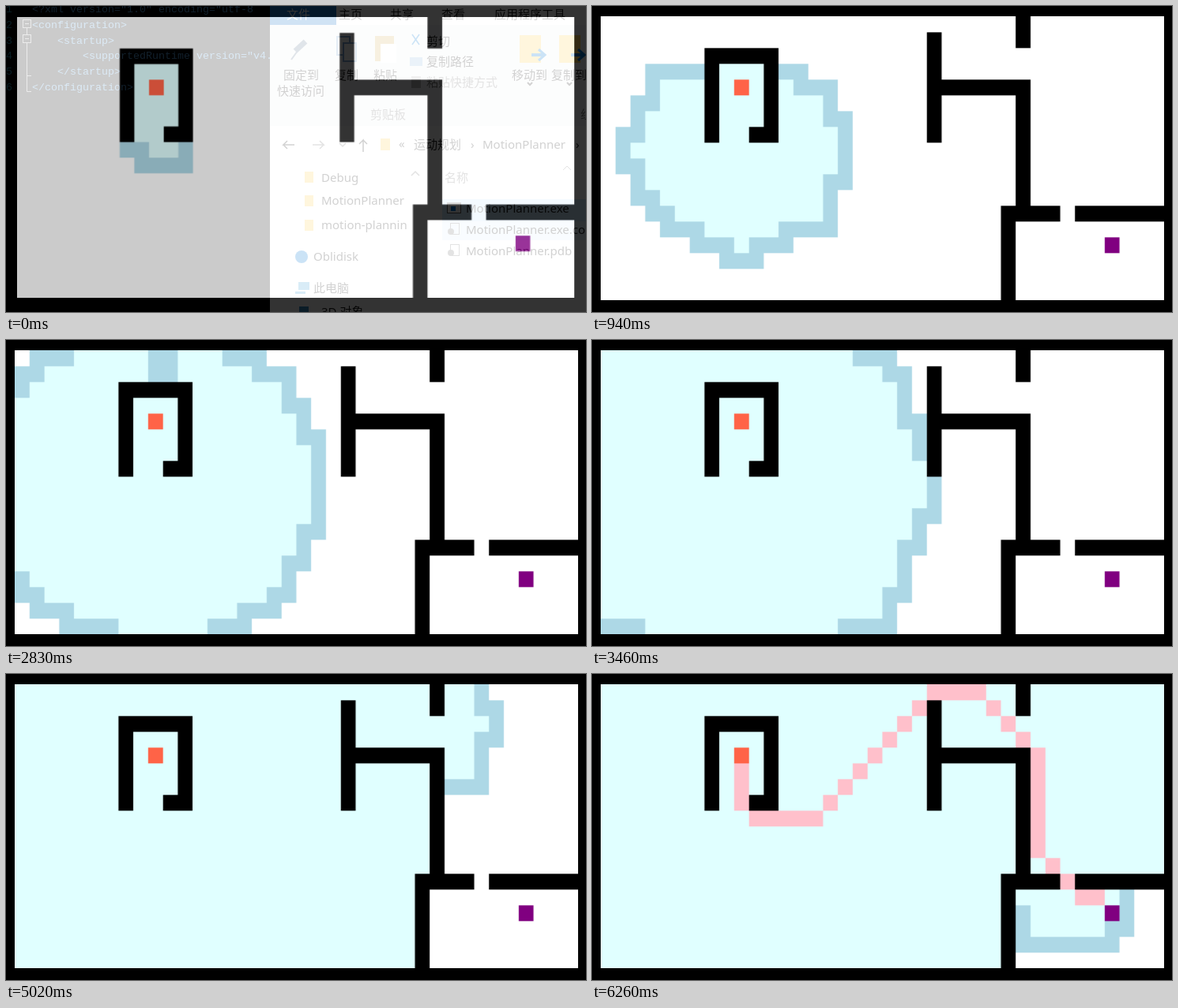
An HTML page with a canvas that plays this animation: 734x388 px, repeating every 8.52 s.

```html
<!DOCTYPE html>
<html lang="zh-CN">
<head>
<meta charset="utf-8">
<title>Grid search</title>
<style>
  html, body { margin: 0; width: 100%; height: 100%; overflow: hidden; background: #000; }
  canvas { display: block; }
</style>
</head>
<body>
<canvas id="stage" width="734" height="388"></canvas>
<script>
const W = 734, H = 388, COLS = 38, ROWS = 18;
const CELL_W = 75, CELL_H = 80, SCALE = 1 / 4, LEFT = 11.2, TOP = 13.4;
const LOOP = 8520, FIRST = 70, STEP = 78.3, LAST = 80;
const START = [9, 4], GOAL = [34, 14];
const COLOR = {
  free: '#fff', wall: '#000', closed: '#e0ffff', open: '#add8e6',
  path: '#ffc0cb', start: '#ff6347', goal: '#800080'
};

function surface(w, h) {
  const c = document.createElement('canvas');
  c.width = w;
  c.height = h;
  return c.getContext('2d');
}

const ctx = document.getElementById('stage').getContext('2d');
// The grid is drawn enlarged, then scaled down for soft cell edges
const grid = surface(COLS * CELL_W, ROWS * CELL_H);
ctx.imageSmoothingQuality = 'high';

// Walls: column, row, width, height in cells
const WALLS = [
  [7, 2, 5, 1], [7, 2, 1, 6], [11, 2, 1, 6], [10, 7, 1, 1],
  [22, 1, 1, 7], [22, 4, 7, 1], [28, 0, 1, 2], [28, 4, 1, 8],
  [27, 12, 4, 1], [32, 12, 6, 1], [27, 12, 1, 6]
];
const PATH = [[9, 5], [9, 7], [10, 8], [14, 8], [22, 0], [25, 0], [29, 4], [29, 10], [32, 13], [33, 13]];

const id = (c, r) => r * COLS + c;
const blocked = new Set();
for (const [c, r, w, h] of WALLS)
  for (let y = r; y < r + h; y++)
    for (let x = c; x < c + w; x++) blocked.add(id(x, y));

function neighbours(n) {
  const c = n % COLS, r = Math.floor(n / COLS), list = [];
  for (let dy = -1; dy <= 1; dy++)
    for (let dx = -1; dx <= 1; dx++) {
      const x = c + dx, y = r + dy;
      if ((!dx && !dy) || x < 0 || y < 0 || x >= COLS || y >= ROWS) continue;
      if (!blocked.has(id(x, y))) list.push([id(x, y), Math.hypot(dx, dy)]);
    }
  return list;
}

// Dijkstra over the eight-connected grid
function distances() {
  const dist = new Map([[id(...START), 0]]), todo = new Set(dist.keys());
  while (todo.size) {
    let best = null;
    for (const n of todo) if (best === null || dist.get(n) < dist.get(best)) best = n;
    todo.delete(best);
    for (const [m, cost] of neighbours(best)) {
      const d = dist.get(best) + cost;
      if (!dist.has(m) || d < dist.get(m) - 1e-9) { dist.set(m, d); todo.add(m); }
    }
  }
  return dist;
}

// Cells in the order they are settled; ties go to the rightmost
const order = [...distances()]
  .map(([n, d]) => ({ n, c: n % COLS, key: Math.round(d * 1e6) }))
  .sort((a, b) => a.key - b.key || b.c - a.c || a.n - b.n)
  .map(o => o.n);

function box(color, x, y, w, h) {
  ctx.fillStyle = color;
  ctx.fillRect(x, y, w, h);
}

function cells(color, c, r, w = 1, h = 1) {
  grid.fillStyle = color;
  grid.fillRect(c * CELL_W, r * CELL_H, w * CELL_W, h * CELL_H);
}

const cell = (color, n) => cells(color, n % COLS, Math.floor(n / COLS));

function drawPath() {
  PATH.forEach(([c, r], i) => {
    cells(COLOR.path, c, r);
    const [ec, er] = PATH[i + 1] || [c, r];
    while (c !== ec || r !== er) {
      c += Math.sign(ec - c);
      r += Math.sign(er - r);
      cells(COLOR.path, c, r);
    }
  });
}

function render(step) {
  const count = Math.round(15.6 + 7.5 * step - 0.0026 * step * step);
  const closed = order.slice(0, count);
  cells(COLOR.free, 0, 0, COLS, ROWS);
  for (const n of closed) for (const [m] of neighbours(n)) cell(COLOR.open, m);
  for (const n of closed) cell(COLOR.closed, n);
  for (const w of WALLS) cells(COLOR.wall, ...w);
  if (step === LAST) drawPath();
  cells(COLOR.start, ...START);
  cells(COLOR.goal, ...GOAL);

  const { width, height } = grid.canvas;
  box(COLOR.wall, 0, 0, W, H);
  ctx.drawImage(grid.canvas, LEFT, TOP, width * SCALE, height * SCALE);
}

const SANS = '"Noto Sans", "Noto Sans CJK SC", "Noto Sans CJK", sans-serif';
const MONO = '"Liberation Mono", monospace';

function text(str, x, y, color = '#000', font = '15px ' + SANS) {
  ctx.fillStyle = color;
  ctx.font = font;
  ctx.fillText(str, x, y);
}

function line(color, width, ...pts) {
  ctx.strokeStyle = color;
  ctx.lineWidth = width;
  ctx.beginPath();
  for (let i = 0; i < pts.length; i += 2) ctx.lineTo(pts[i], pts[i + 1]);
  ctx.stroke();
}

function disc(color, x, y, r) {
  ctx.fillStyle = color;
  ctx.beginPath();
  ctx.arc(x, y, r, 0, 7);
  ctx.fill();
}

function clipped(x, y, w, h, draw) {
  ctx.save();
  ctx.beginPath();
  ctx.rect(x, y, w, h);
  ctx.clip();
  draw();
  ctx.restore();
}

function drawEditor() {
  const code = [
    [33, '<?xml version="1.0" encoding="utf-8'], [33, '<configuration>'], [65, '<startup>'],
    [97, '<supportedRuntime version="v4.'], [65, '</startup>'], [33, '</configuration>']
  ];
  box('#000', 0, 0, 334, H);
  code.forEach(([x, str], i) => {
    const y = 8 + 19.8 * i;
    text(i + 1, 0, y, '#2b91af', '13.33px ' + MONO);
    text(str, x, y, '#569cd6', '13.33px ' + MONO);
  });
  line('#a5a5a5', 1, 26.5, 27, 26.5, 108.5, 32, 108.5);
  line('#a5a5a5', 1, 26.5, 88.5, 32, 88.5);
  for (const y of [17.5, 36.5]) {
    box('#000', 21, y, 11, 10);
    ctx.strokeRect(21.5, y, 10, 10);
    line('#a5a5a5', 1, 24, y + 5, 29, y + 5);
  }
}

function drawExplorer() {
  const ink = '#222', grey = '#777', blue = '#0078d7', gold = '#ffd35c';
  const labels = [
    ['主页', 421, 16], ['共享', 486, 16], ['查看', 551, 16], ['应用程序工具', 618, 16],
    ['固定到', 351, 93], ['快速访问', 343, 113], ['复制', 416, 93], ['粘贴', 465, 93],
    ['剪切', 532, 50], ['复制路径', 532, 76], ['移动到', 640, 93], ['复制到', 690, 93],
    ['«', 497, 180], ['运动规划', 516, 181], ['›', 588, 181], ['MotionPlanner', 603, 181], ['›', 721, 181],
    ['Debug', 399, 223], ['MotionPlanner', 399, 252],
    ['Oblidisk', 389, 323], ['此电脑', 389, 363], ['3D 对象', 399, 393]
  ];
  box('#fff', 334, 0, 400, H);
  box('#f5f6f7', 334, 24, 400, 128);
  box('#1979ca', 334, 0, 84, 24);
  text('文件', 355, 16, '#fff');
  box('#cce8ff', 552, 245, 182, 28);
  box('#e5f3ff', 552, 273, 182, 24);
  for (const l of labels) text(...l, ink);
  for (const l of [['粘贴快捷方式', 532, 102], ['剪贴板', 461, 143], ['组', 727, 143], ['名称', 555, 223]])
    text(...l, grey);
  ['MotionPlanner.exe', 'MotionPlanner.exe.config', 'MotionPlanner.pdb']
    .forEach((name, i) => text(name, 582, 262 + 27 * i, ink));
  clipped(334, 260, 174, 40, () => text('motion-planning', 399, 283, ink));

  // Ribbon icons
  line('#6b8299', 7, 366, 57, 379, 45);
  line('#6b8299', 2, 361, 68, 369, 57);
  for (const [x, y] of [[418, 38], [426, 46]]) {
    box('#7da7d0', x, y, 18, 25);
    box('#fff', x + 2, y + 2, 14, 21);
  }
  box('#d8b66a', 467, 38, 24, 32);
  box('#fff', 474, 48, 20, 24);
  line(blue, 1.5, 514, 36, 523, 49);
  line(blue, 1.5, 523, 36, 514, 49);
  box('#9cc3e6', 511, 65, 16, 11);
  box('#bbb', 513, 89, 12, 15);
  for (const x of [650, 700]) {
    box(gold, x, 37, 27, 35);
    line(blue, 4, x + 15, 62, x + 31, 62);
    line(blue, 3, x + 24, 55, x + 32, 62, x + 24, 69);
    line(ink, 2, x + 10, 97, x + 13, 100, x + 16, 97);
  }

  // Navigation and tree icons
  line(ink, 1.5, 365, 176, 351, 176, 356, 171);
  line(ink, 1.5, 351, 176, 356, 181);
  line(grey, 1.5, 388, 176, 402, 176, 397, 171);
  line(grey, 1.5, 402, 176, 397, 181);
  line(grey, 1.5, 422, 174, 426, 178, 430, 174);
  line(ink, 1.5, 452, 185, 452, 170, 447, 175);
  line(ink, 1.5, 452, 170, 457, 175);
  line(grey, 1.5, 513, 215, 518, 210, 523, 215);
  line(grey, 1, 705, 208, 710, 203, 715, 208);
  box(gold, 474, 168, 12, 15);
  for (const y of [210, 240, 271]) box(gold, 378, y, 11, 14);
  disc(blue, 374, 318, 8);
  box('#48a4dc', 370, 350, 14, 10);
  box('#48a4dc', 366, 362, 13, 3);
  box('#3a8ac0', 371, 381, 12, 7);
  box('#555', 558, 249, 18, 14);
  box('#fff', 559, 252, 16, 10);
  box(blue, 563, 254, 6, 6);
  for (const y of [275, 302]) {
    ctx.strokeStyle = grey;
    ctx.strokeRect(562.5, y + .5, 11, 14);
    disc(grey, 563, y + 11, 4);
  }
}

// The maze window, slightly small and see-through, over the desktop
function drawOpening() {
  const shot = surface(W, H), zoomed = surface(W, H);
  render(0);
  shot.drawImage(ctx.canvas, 0, 0);
  zoomed.fillRect(0, 0, W, H);
  zoomed.drawImage(shot.canvas, 3.1, 1.1, W * .989, H * .989);
  clipped(0, 0, 334, H, drawEditor);
  drawExplorer();
  ctx.globalAlpha = .795;
  ctx.drawImage(zoomed.canvas, 0, 0);
  ctx.globalAlpha = 1;
}

let shown = -1;
const begin = performance.now();
function tick() {
  const t = (performance.now() - begin) % LOOP;
  const step = t < FIRST ? 0 : Math.min(LAST, 1 + Math.floor((t - FIRST) / STEP));
  if (step !== shown) {
    if (step) render(step);
    else drawOpening();
    shown = step;
  }
  requestAnimationFrame(tick);
}
tick();
</script>
</body>
</html>
```
